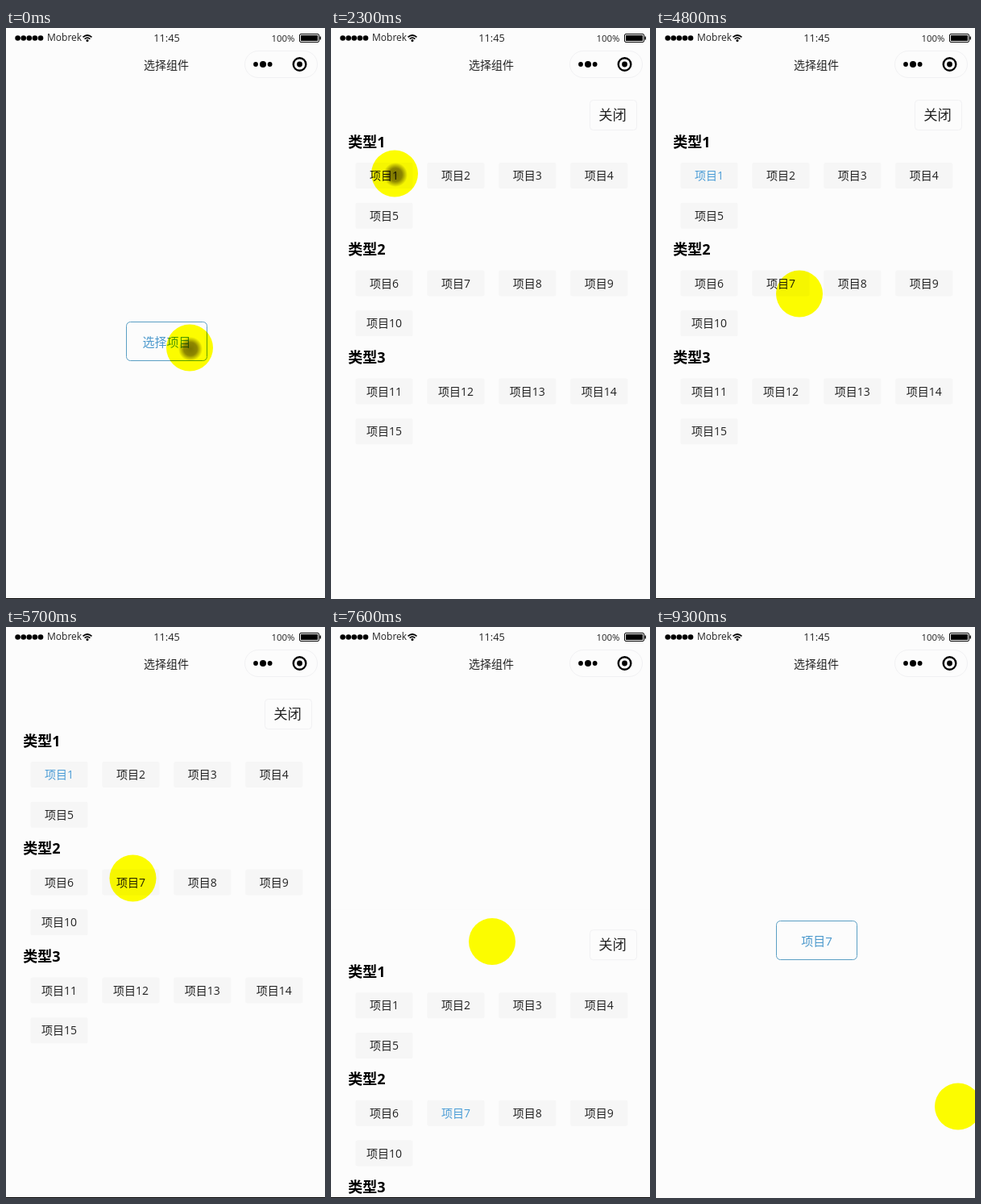
Animation, 396 px wide and 708 px high, one loop 9.4 s. Source, as an HTML page:

```html
<!DOCTYPE html>
<html lang="zh">
<head>
<meta charset="utf-8">
<title>选择组件</title>
<style>
  html, body { margin: 0; width: 100%; height: 100%; overflow: hidden; background: #fcfcfc; }
  svg { display: block; width: 396px; height: 708px; isolation: isolate; }
  text { font-family: "Open Sans", "Noto Sans CJK SC", "Noto Sans CJK", sans-serif; font-size: 14px; fill: #222; }
  .mid { text-anchor: middle; }
  .bg { fill: #fcfcfc; }
  .cell { fill: #f6f6f6; }
  .head { font-size: 18px; font-weight: 700; fill: #000; }
  .faint { fill: none; stroke: #f1f1f3; }
  .picked { fill: #4a9cd6; }
  #label { font-size: 15px; fill: #4a98cc; }
  #cursor { mix-blend-mode: multiply; }
</style>
</head>
<body>
<svg viewBox="0 0 396 708">
  <defs>
    <radialGradient id="press">
      <stop offset="0" stop-color="#7d7600"/>
      <stop offset=".55" stop-color="#918a00"/>
      <stop offset="1" stop-color="#ff0"/>
    </radialGradient>
  </defs>
  <rect class="bg" width="396" height="708"/>

  <rect x="149.5" y="364.5" width="100" height="48" rx="5" fill="none" stroke="#5b9fc4"/>
  <text id="label" class="mid" x="199.5" y="394.5">选择项目</text>

  <g id="panel">
    <rect class="bg" y="64" width="396" height="644"/>
    <rect class="faint" x="321.5" y="89.5" width="58" height="37" rx="4"/>
    <text class="mid" x="349.5" y="113.5" style="font-size:17.3px">关闭</text>
  </g>

  <rect class="bg" width="396" height="64"/>
  <g id="signal"></g>
  <text x="51" y="16" style="font-size:12px">Mobrek</text>
  <g fill="none" stroke="#000" stroke-width="1.7">
    <path d="M95.5 11.3Q101 6.7 106.5 11.3M97.6 13.6Q101 10.8 104.4 13.6"/>
    <circle cx="101" cy="15.6" r=".7"/>
  </g>
  <text class="mid" x="199.5" y="17" style="font-size:12.7px">11:45</text>
  <text x="329.5" y="17" style="font-size:11.4px">100%</text>
  <rect x="364.5" y="7.5" width="24" height="10" rx="1.5" fill="none" stroke="#000"/>
  <rect x="366" y="9" width="21" height="7"/>
  <path d="M389.5 10.5h1.5v4h-1.5z"/>
  <text class="mid" x="199" y="51">选择组件</text>
  <rect class="faint" x="296.5" y="28.5" width="90" height="33" rx="16.5"/>
  <circle cx="310" cy="45" r="2.9"/>
  <circle cx="319" cy="45" r="4"/>
  <circle cx="327.6" cy="45" r="2.9"/>
  <circle cx="364.5" cy="45" r="7.8" fill="none" stroke="#000" stroke-width="2.4"/>
  <circle cx="364.5" cy="45" r="3.4"/>

  <rect id="edge" y="707" width="396" height="1"/>
  <g id="cursor">
    <circle r="29" fill="#ff0"/>
    <circle id="dot" cx="1" cy="1.5" r="15" fill="url(#press)"/>
  </g>
</svg>
<script>
const LOOP = 9400, STEP = 100, SLIDE = 300;
const $ = id => document.getElementById(id);

function add(parent, tag, attrs, content = '') {
  const el = document.createElementNS('http://www.w3.org/2000/svg', tag);
  for (const key in attrs) el.setAttribute(key, attrs[key]);
  el.textContent = content;
  return parent.appendChild(el);
}

for (let i = 0; i < 5; i++) add($('signal'), 'circle', { cx: 14.6 + i * 7.1, cy: 12.5, r: 3.3 });

const items = [];
[141, 274.5, 408.5].forEach((top, group) => {
  add($('panel'), 'text', { class: 'head', x: 21.3, y: top + 6.5 }, '类型' + (group + 1));
  for (let i = 0; i < 5; i++) {
    const x = 66 + (i % 4) * 88.9, y = top + 42 + (i > 3 ? 49.7 : 0);
    add($('panel'), 'rect', { class: 'cell', x: x - 35.5, y: y - 16, width: 71, height: 32, rx: 2 });
    items.push(add($('panel'), 'text', { class: 'mid', x, y: y + 5.2 }, '项目' + (group * 5 + i + 1)));
  }
});

// time, x, y
const path = [
  [0, 228, 396.5], [800, 228, 396.5], [1500, 82, 172], [2100, 79, 180.5], [2600, 79, 180.5],
  [3050, 130, 271], [3600, 193, 381], [4200, 193, 381], [4800, 178, 329.5], [5400, 160, 301],
  [5800, 157, 313.5], [6700, 157, 313.5], [7150, 200, 390], [7600, 200, 390], [8200, 314, 166.5],
  [8500, 348, 108], [9000, 348, 108], [9300, 375, 594.5], [LOOP, 375, 594.5]
];
const clicks = [0, 2200, 3700, 5900, 7200, 8600];
const visits = [[200, 2500], [4100, 6100], [7500, 8800]];

const clamp = v => Math.max(0, Math.min(1, v));
const easeOut = v => 1 - (1 - clamp(v)) ** 2;
const smooth = v => v * v * (3 - 2 * v);

function cursorAt(t) {
  const i = path.findIndex(p => p[0] > t);
  const [t0, x0, y0] = path[i - 1], [t1, x1, y1] = path[i];
  const k = smooth((t - t0) / (t1 - t0));
  return [x0 + (x1 - x0) * k, y0 + (y1 - y0) * k];
}

function openness(t) {
  return visits.reduce((sum, [open, close]) =>
    sum + easeOut((t - open) / SLIDE) - easeOut((t - close) / SLIDE), 0);
}

function draw() {
  const t = Math.floor(performance.now() % LOOP / STEP) * STEP;
  const choice = t >= 6000 ? 7 : t >= 2400 ? 1 : 0;

  $('cursor').setAttribute('transform', `translate(${cursorAt(t)})`);
  $('dot').style.display = clicks.some(c => t >= c && t < c + 200) ? '' : 'none';
  $('panel').setAttribute('transform', `translate(0 ${644 * (1 - openness(t))})`);
  $('label').textContent = choice ? '项目' + choice : '选择项目';
  items.forEach((el, i) => el.classList.toggle('picked', i + 1 === choice));
  $('edge').style.display = (t >= 2000 && t < 2600) || t >= 9200 ? 'none' : '';
  requestAnimationFrame(draw);
}
draw();
</script>
</body>
</html>
```
